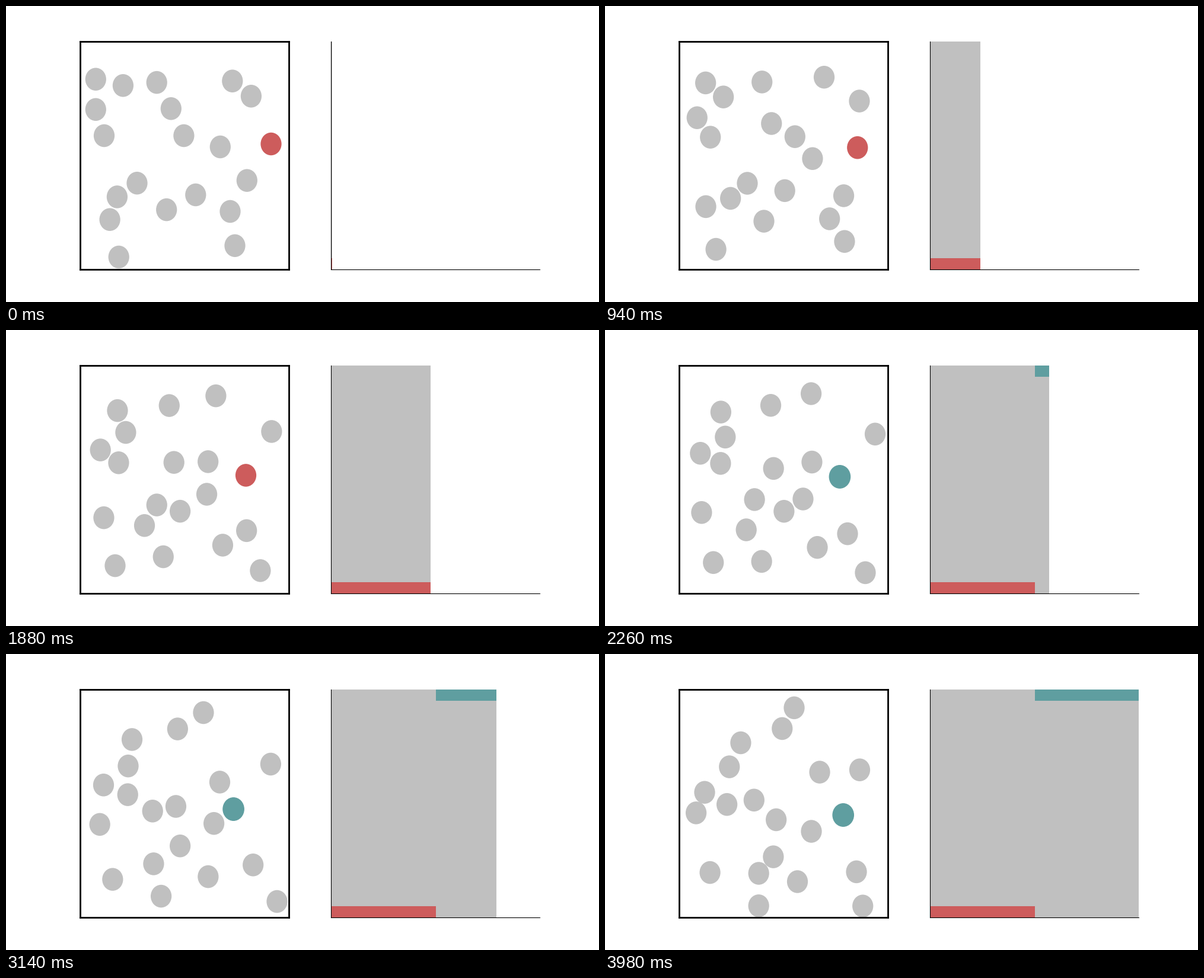
These frames come from a looping animation (1000 by 500 pixels, 4 s). A matplotlib script:

```python
from itertools import combinations

import numpy as np
import matplotlib.pyplot as plt
from matplotlib.animation import FuncAnimation
from matplotlib.patches import Circle, Rectangle

FRAMES, INTERVAL = 200, 20
SWITCH = 100                      # step at which the marked disk turns teal
GREY, RED, TEAL = "silver", "indianred", "cadetblue"

# Panels in stage pixels, y pointing down; a disk is a twentieth of the box wide
TOP, BOTTOM = 60, 445
BOX_L, BOX_R = 125, 477.27
CHART_L, CHART_R = 547.73, 900
SIDE = 20
RADIUS = np.array([BOX_R - BOX_L, BOTTOM - TOP]) / SIDE

# Initial state of the gas: x, y in pixels, vx, vy in pixels per second
GAS = np.array([
    (447, 233, -22.6, 6.6),
    (151.3, 123.7, 19.5, 6.6),
    (197.4, 134.3, 2.4, 20.6),
    (254.2, 129.1, 11.2, -0.8),
    (381.8, 126.7, 16.8, 16.6),
    (413.4, 152.3, -13.3, -14.7),
    (151.3, 174.8, 4.2, 14.8),
    (165.5, 219, 13, 2.8),
    (278.3, 173.3, 2.6, 26.8),
    (299.9, 219, 21.7, 1.8),
    (361.3, 238, -12.1, 21),
    (319.8, 319, -17.7, -7.6),
    (221, 299.2, 20.2, 0.3),
    (187.4, 322.4, 25.8, 2.7),
    (406.3, 294.7, -4, 27.4),
    (378, 347, 4.2, 21.1),
    (386, 404.8, 15.6, -15.4),
    (270.7, 344.1, -2.9, 20.7),
    (175.1, 360.7, -5.4, -23.2),
    (190.2, 424, -3.3, -13.8),
])


def simulate(gas, steps):
    """Elastic disks of radius 1 in a square box; one array of centres per step."""
    pos = (gas[:, :2] - (BOX_L, TOP)) / RADIUS
    vel = gas[:, 2:] / RADIUS * INTERVAL / 1000
    history = [pos.copy()]
    for _ in range(steps - 1):
        pos += vel
        for a, b in combinations(range(len(pos)), 2):
            gap = pos[b] - pos[a]
            dist = np.hypot(*gap)
            if dist < 2:
                normal = gap / dist
                closing = (vel[b] - vel[a]) @ normal
                if closing < 0:
                    vel[a] += closing * normal
                    vel[b] -= closing * normal
        outside = (pos < 1) | (pos > SIDE - 1)
        vel[outside] *= -1
        pos = np.clip(pos, 1, SIDE - 1)
        history.append(pos.copy())
    return history


def chart_x(i):
    """Right edge of the chart after step i, on whole pixels."""
    step = (CHART_R - CHART_L) / FRAMES
    return min(round(CHART_L + step * (i + 1) + 0.8), CHART_R)


fig, (box, chart) = plt.subplots(1, 2, figsize=(10, 5), dpi=100)
fig.subplots_adjust(left=0.125, right=0.9, bottom=0.11, top=0.88, wspace=0.2)
box.set(xlim=(0, SIDE), ylim=(SIDE, 0), xticks=[], yticks=[])
chart.set(xlim=(CHART_L, CHART_R), ylim=(BOTTOM, TOP), xticks=[], yticks=[])
for spine in box.spines.values():
    spine.set_linewidth(2)
chart.spines[["top", "right"]].set_visible(False)

history = simulate(GAS, FRAMES)
disks = [box.add_patch(Circle((0, 0), 1, fc=GREY, lw=0)) for _ in GAS]
marked = disks[0]
marked.set_zorder(1.5)


def band(x, y, height, color):
    return chart.add_patch(Rectangle((x, y), 0, height, fc=color, lw=0))


start, turn = 548, chart_x(SWITCH - 1)
grey_band = band(start, TOP, BOTTOM - TOP, GREY)
red_band = band(start, BOTTOM - 19, 19, RED)
teal_band = band(turn, TOP, 19, TEAL)


def draw(i):
    for disk, center in zip(disks, history[i]):
        disk.center = center
    late = i >= SWITCH
    marked.set(color=TEAL if late else RED, linewidth=1 if late else 0)

    edge = chart_x(i)
    grey_band.set_width(edge - start)
    red_band.set_width(min(edge, turn) - start)
    teal_band.set_width(max(edge - turn, 0))
    return [*disks, grey_band, red_band, teal_band]


anim = FuncAnimation(fig, draw, frames=FRAMES, interval=INTERVAL,
                     init_func=lambda: draw(0), repeat=True, repeat_delay=0)
plt.show()
```
